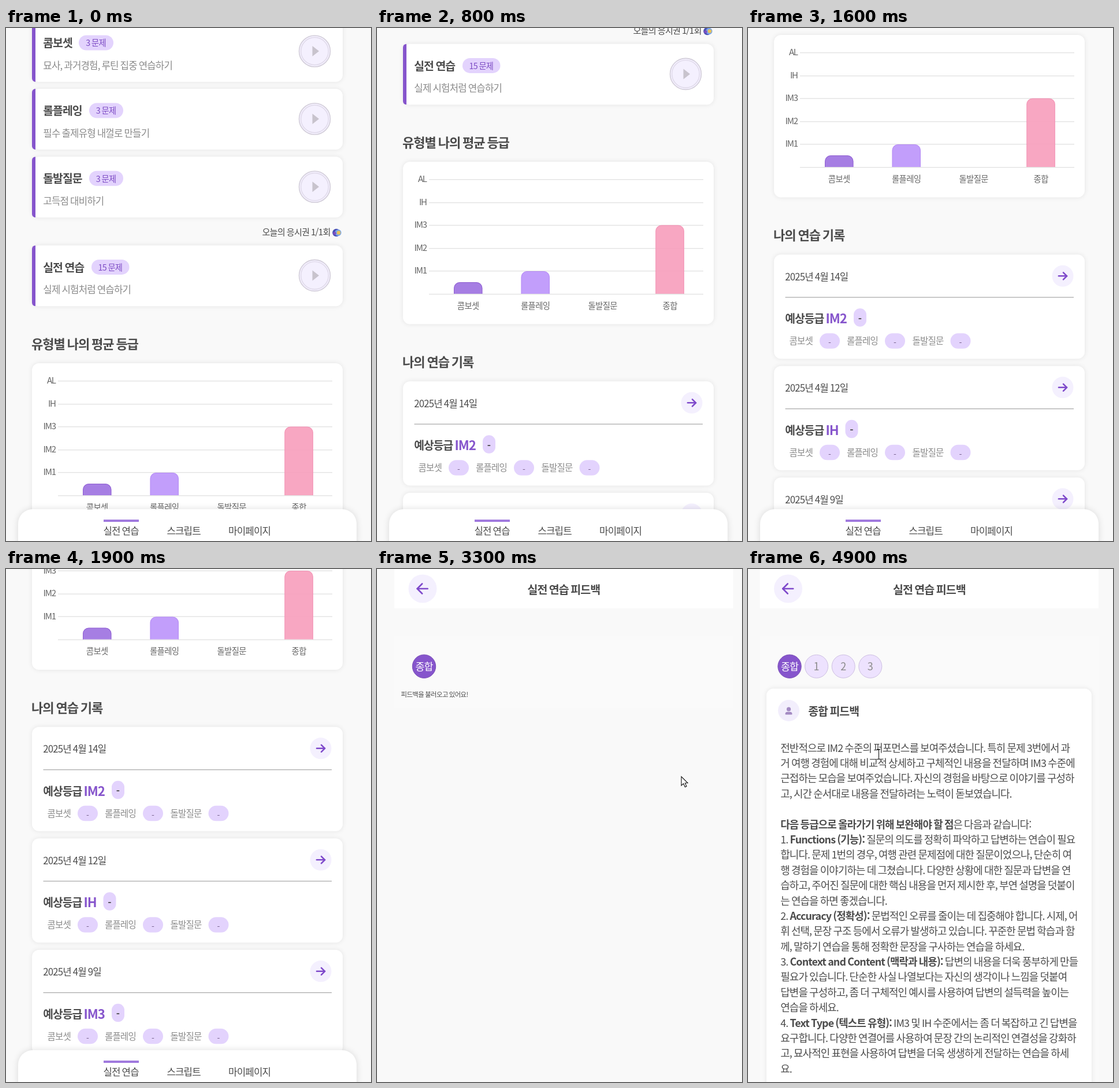
An HTML page with a canvas that plays this animation: 632x886 px, repeating every 5000 ms.

```html
<!DOCTYPE html>
<html lang="ko">
<head>
<meta charset="utf-8">
<style>
html, body { margin: 0; width: 100%; height: 100%; overflow: hidden; background: #f9f9f9; }
canvas { display: block; width: 632px; height: 886px; }
</style>
</head>
<body>
<canvas id="stage"></canvas>
<script>
const W = 632, H = 886, LOOP = 5000, STEP = 100;
const FONT = '"Noto Sans CJK KR", "Noto Sans CJK", "Noto Sans", sans-serif';
const PURPLE = '#8655cc', LILAC = '#e3d3fd', PALE = '#f4f0fe';
const DARK = '#4b4b4b', GRAY = '#8b8b8b';

const canvas = document.getElementById('stage');
const ctx = canvas.getContext('2d');
const dpr = window.devicePixelRatio || 1;
canvas.width = W * dpr;
canvas.height = H * dpr;

// [time, value...] keys
const SCROLL = [[0, 0], [800, 348], [1400, 488], [1900, 685.5], [2300, 817]];
const POINTER = [[2400, 593, 396], [2500, 581, 385], [2700, 563, 372], [3100, 563, 371],
  [3300, 527, 358], [4000, 280, 209], [4500, 234, 296], [4900, 226, 320]];
const OPEN_AT = 2800, LOADED_AT = 3800;

function track(keys, t) {
  let i = 0;
  while (i < keys.length - 1 && keys[i + 1][0] <= t) i++;
  const a = keys[i], b = keys[i + 1];
  if (!b || t <= a[0]) return a.slice(1);
  const k = (t - a[0]) / (b[0] - a[0]);
  return a.slice(1).map((v, n) => v + (b[n + 1] - v) * k);
}

// y is the vertical middle of the glyphs; returns the end x
function text(str, x, y, size, color = DARK, weight = 400, align = 'left', tight = 0.05) {
  ctx.font = `${weight} ${size}px ${FONT}`;
  ctx.letterSpacing = `${-tight * size}px`;
  ctx.textAlign = 'left';
  ctx.fillStyle = color;
  const w = ctx.measureText(str).width;
  const shift = { left: -0.04 * size, center: -(w + tight * size) / 2, right: -w - tight * size }[align];
  ctx.fillText(str, x + shift, y + 0.37 * size);
  return x + w;
}

function box(x, y, w, h, r, fill, stroke) {
  ctx.beginPath();
  ctx.roundRect(x, y, w, h, r);
  if (fill) { ctx.fillStyle = fill; ctx.fill(); }
  if (stroke) { ctx.strokeStyle = stroke; ctx.lineWidth = 1; ctx.stroke(); }
}

function shaded(draw, blur = 9, alpha = 0.09) {
  ctx.save();
  ctx.shadowColor = `rgba(0,0,0,${alpha})`;
  ctx.shadowBlur = blur * dpr;
  draw();
  ctx.restore();
}

function disc(x, y, r, fill, stroke, width = 1) {
  ctx.beginPath();
  ctx.arc(x, y, r, 0, 7);
  if (fill) { ctx.fillStyle = fill; ctx.fill(); }
  if (stroke) { ctx.strokeStyle = stroke; ctx.lineWidth = width; ctx.stroke(); }
}

function path(points, close) {
  ctx.beginPath();
  points.forEach(([x, y]) => ctx.lineTo(x, y));
  if (close) ctx.closePath();
}

function line(x1, y, x2, color, width = 1) {
  ctx.fillStyle = color;
  ctx.fillRect(x1, y, x2 - x1, width);
}

function arrow(x, y, len, head, dir) {
  ctx.save();
  ctx.translate(x, y);
  ctx.scale(dir, 1);
  ctx.strokeStyle = '#7f4acb';
  ctx.lineWidth = 2.6;
  ctx.lineCap = ctx.lineJoin = 'round';
  path([[-len, 0], [len, 0]]);
  ctx.stroke();
  path([[len - head, -head], [len, 0], [len - head, head]]);
  ctx.stroke();
  ctx.restore();
}

function practiceCard(top, title, count, hint, pillX, pillW) {
  shaded(() => box(45, top, 538, 105, 12, '#fff'));
  ctx.save();
  box(45, top, 538, 105, [6, 12, 12, 6]);
  ctx.clip();
  ctx.fillStyle = PURPLE;
  ctx.fillRect(45, top, 6, 105);
  ctx.restore();
  text(title, 65, top + 38, 19.4, DARK, 700);
  box(pillX, top + 24.5, pillW, 26, 13, LILAC);
  text(count + ' 문제', pillX + pillW / 2, top + 38, 14.3, '#7c4bc4', 400, 'center');
  text(hint, 65, top + 76.5, 16.8, GRAY);
  const x = 534.5, y = top + 52;
  disc(x, y, 27, PALE, '#d3ceda', 1.6);
  disc(x, y, 23.8, null, '#dfd9e9', 1.4);
  path([[x - 4, y - 9], [x + 7.5, y], [x - 4, y + 9]], true);
  ctx.fillStyle = '#c8c3cd';
  ctx.fill();
}

function coin(x, y) {
  disc(x - 1, y, 6.8, '#4a50b4');
  disc(x + 2, y, 5.6, '#7aa6e8');
  disc(x + 3, y, 3.2, '#e8c25a');
  disc(x - 4, y + 1, 2.6, '#7d4fc0');
}

function bar(x, y, fill, edge) {
  box(x, y, 49.5, 807 - y, [10, 10, 0, 0], fill);
  ctx.save();
  ctx.clip();
  box(x + 0.5, y + 0.5, 48.5, 820 - y, [10, 10, 0, 0], null, edge);
  ctx.restore();
}

function chart() {
  text('유형별 나의 평균 등급', 45, 546, 22.1, DARK, 700);
  shaded(() => box(45, 579, 538, 280.5, 12, '#fff'));
  ['AL', 'IH', 'IM3', 'IM2', 'IM1', ''].forEach((name, i) => {
    const y = 609 + i * 39.6;
    line(90, Math.round(y), 565, '#e3e3e3', 1.4);
    text(name, 87, y - 0.5, 15, '#666', 400, 'right', 0.08);
  });
  bar(133, 787, '#a67ee3', '#8f5fd0');
  bar(249.5, 768, '#c29efb', '#b68cf4');
  bar(482.3, 688.5, 'rgba(248,160,189,.92)', '#f193b5');
  ['콤보셋', '롤플레잉', '돌발질문', '종합'].forEach((name, i) =>
    text(name, 158 + i * 116.5, 827.5, 14.4, '#666', 400, 'center'));
}

function record(top, day, grade) {
  shaded(() => box(45, top, 538, 180, 12, '#fff'));
  text(`2025년 4월 ${day}일`, 65, top + 38, 16.8, DARK, 500);
  disc(545, top + 37, 18.5, PALE);
  arrow(545, top + 37, 7, 6, 1);
  line(64.5, top + 73.2, 564, '#adadad', 1.3);
  text('예상등급', 65, top + 111, 19.3, DARK, 700);
  text(grade, 135.5, top + 110.5, 22.3, PURPLE, 700);
  const x = grade === 'IH' ? 168.5 : 183;
  box(x, top + 93, 22, 31.5, 11, LILAC);
  text('-', x + 11, top + 109, 17, DARK, 700, 'center');
  [['콤보셋', 72, 124], ['롤플레잉', 171.5, 237], ['돌발질문', 285, 350.5]].forEach(([name, nx, px]) => {
    text(name, nx, top + 149, 15.6, GRAY);
    box(px, top + 136, 35, 26.5, 13.2, LILAC);
    text('-', px + 17.5, top + 151, 14, '#76618f', 400, 'center');
  });
}

function nav() {
  shaded(() => box(21, 831, 586, 80, 25, '#fff'), 12, 0.13);
  line(169, 849, 230, '#a07ade', 4);
  text('실전 연습', 199.5, 868.5, 16.8, DARK, 400, 'center');
  text('스크립트', 308, 868.5, 16.8, DARK, 400, 'center');
  text('마이페이지', 422, 868.5, 16.8, DARK, 400, 'center');
}

function home(t) {
  ctx.save();
  ctx.translate(0, -track(SCROLL, t)[0]);
  practiceCard(-12, '콤보셋', 3, '묘사, 과거경험, 루틴 집중 연습하기', 126, 60);
  practiceCard(105, '롤플레잉', 3, '필수 출제유형 내껄로 만들기', 144, 59);
  practiceCard(222.3, '돌발질문', 3, '고득점 대비하기', 144, 59);
  text('오늘의 응시권 1/1회', 444, 352, 15.2);
  coin(573, 353.5);
  practiceCard(375.4, '실전 연습', 15, '실제 시험처럼 연습하기', 148, 65.5);
  chart();
  text('나의 연습 기록', 45, 925, 22.1, DARK, 700);
  [[14, 'IM2'], [12, 'IH'], [9, 'IM3'], [8, 'IM2']].forEach(([day, grade], i) =>
    record(958.3 + i * 192.5, day, grade));
  ctx.restore();
  nav();
}

// Bars switch bold on and off
const FEEDBACK = [
  '전반적으로 IM2 수준의 퍼포먼스를 보여주셨습니다. 특히 문제 3번에서 과',
  '거 여행 경험에 대해 비교적 상세하고 구체적인 내용을 전달하며 IM3 수준에',
  '근접하는 모습을 보여주었습니다. 자신의 경험을 바탕으로 이야기를 구성하',
  '고, 시간 순서대로 내용을 전달하려는 노력이 돋보였습니다.',
  '',
  '|다음 등급으로 올라가기 위해 보완해야 할 점|은 다음과 같습니다:',
  '1. |Functions (기능):| 질문의 의도를 정확히 파악하고 답변하는 연습이 필요',
  '합니다. 문제 1번의 경우, 여행 관련 문제점에 대한 질문이었으나, 단순히 여',
  '행 경험을 이야기하는 데 그쳤습니다. 다양한 상황에 대한 질문과 답변을 연',
  '습하고, 주어진 질문에 대한 핵심 내용을 먼저 제시한 후, 부연 설명을 덧붙이',
  '는 연습을 하면 좋겠습니다.',
  '2. |Accuracy (정확성):| 문법적인 오류를 줄이는 데 집중해야 합니다. 시제, 어',
  '휘 선택, 문장 구조 등에서 오류가 발생하고 있습니다. 꾸준한 문법 학습과 함',
  '께, 말하기 연습을 통해 정확한 문장을 구사하는 연습을 하세요.',
  '3. |Context and Content (맥락과 내용):| 답변의 내용을 더욱 풍부하게 만들',
  '필요가 있습니다. 단순한 사실 나열보다는 자신의 생각이나 느낌을 덧붙여',
  '답변을 구성하고, 좀 더 구체적인 예시를 사용하여 답변의 설득력을 높이는',
  '연습을 하세요.',
  '4. |Text Type (텍스트 유형):| IM3 및 IH 수준에서는 좀 더 복잡하고 긴 답변을',
  '요구합니다. 다양한 연결어를 사용하여 문장 간의 논리적인 연결성을 강화하',
  '고, 묘사적인 표현을 사용하여 답변을 더욱 생생하게 전달하는 연습을 하세',
  '요.'
];

function feedbackCard() {
  [1, 2, 3].forEach(n => {
    const x = 72 + n * 46.6;
    disc(x, 168.2, 20, '#ede2fe', '#cdbfe2');
    text(String(n), x, 168.5, 18, GRAY, 400, 'center');
  });
  shaded(() => box(32, 206.5, 563, 720, 12, '#fff'));
  disc(70.5, 244.5, 18.5, '#f2eefc');
  disc(70.5, 242.2, 3.6, '#a48bc3');
  box(64.5, 246.8, 12, 4.7, [4, 4, 1, 1], '#a48bc3');
  text('종합 피드백', 105, 245.5, 19.4, DARK, 700);
  FEEDBACK.forEach((row, i) => {
    let x = 57;
    row.split('|').forEach((run, n) => {
      if (run) x = text(run, x, 309 + i * 26.39, 17.9, DARK, n % 2 ? 700 : 400);
    });
  });
}

function feedback(t) {
  const loaded = t >= LOADED_AT, dx = loaded ? 0 : 9.5;
  ctx.fillStyle = '#fff';
  ctx.fillRect(20.5 + dx, 0, 586.5, 68);
  ctx.fillStyle = '#fafafa';
  ctx.fillRect(20.5 + dx, 116, 586.5, loaded ? H : 124);
  disc(69.5 + dx, 34, 24.5, PALE);
  arrow(69.2 + dx, 34, 9, 8.5, -1);
  text('실전 연습 피드백', 314.3 + dx, 35.5, 19.5, DARK, 700, 'center');
  disc(72 + dx, 168.2, 20.2, PURPLE, '#7a4fb6');
  text('종합', 72.5 + dx, 168.5, 17.4, '#fff', 500, 'center');
  if (loaded) feedbackCard();
  else text('피드백을 불러오고 있어요!', 42, 216.5, 11.4);
}

function pointer(t) {
  if (t < POINTER[0][0]) return;
  const [x, y] = track(POINTER, t);
  ctx.save();
  ctx.translate(x, y);
  ctx.lineWidth = 1.1;
  ctx.strokeStyle = '#111';
  if (t >= LOADED_AT && y > 295) {
    path([[-3, -8.5], [3, -8.5]]);
    ctx.moveTo(0.5, -8.5);
    ctx.lineTo(0.5, 8.5);
    ctx.moveTo(-3, 8.5);
    ctx.lineTo(3, 8.5);
  } else {
    path([[0, 0.5], [0, 16], [3.6, 12.7], [6.4, 18.6], [9, 17.5], [6.4, 11.8], [11, 11.5]], true);
    ctx.fillStyle = '#fff';
    ctx.fill();
  }
  ctx.stroke();
  ctx.restore();
}

function frame(now) {
  const t = Math.floor((now % LOOP) / STEP) * STEP;
  ctx.setTransform(dpr, 0, 0, dpr, 0, 0);
  ctx.fillStyle = '#f9f9f9';
  ctx.fillRect(0, 0, W, H);
  if (t < OPEN_AT) home(t);
  else feedback(t);
  pointer(t);
}

let start;
function tick(now) {
  start ??= now;
  frame(now - start);
  requestAnimationFrame(tick);
}
requestAnimationFrame(tick);
</script>
</body>
</html>
```
